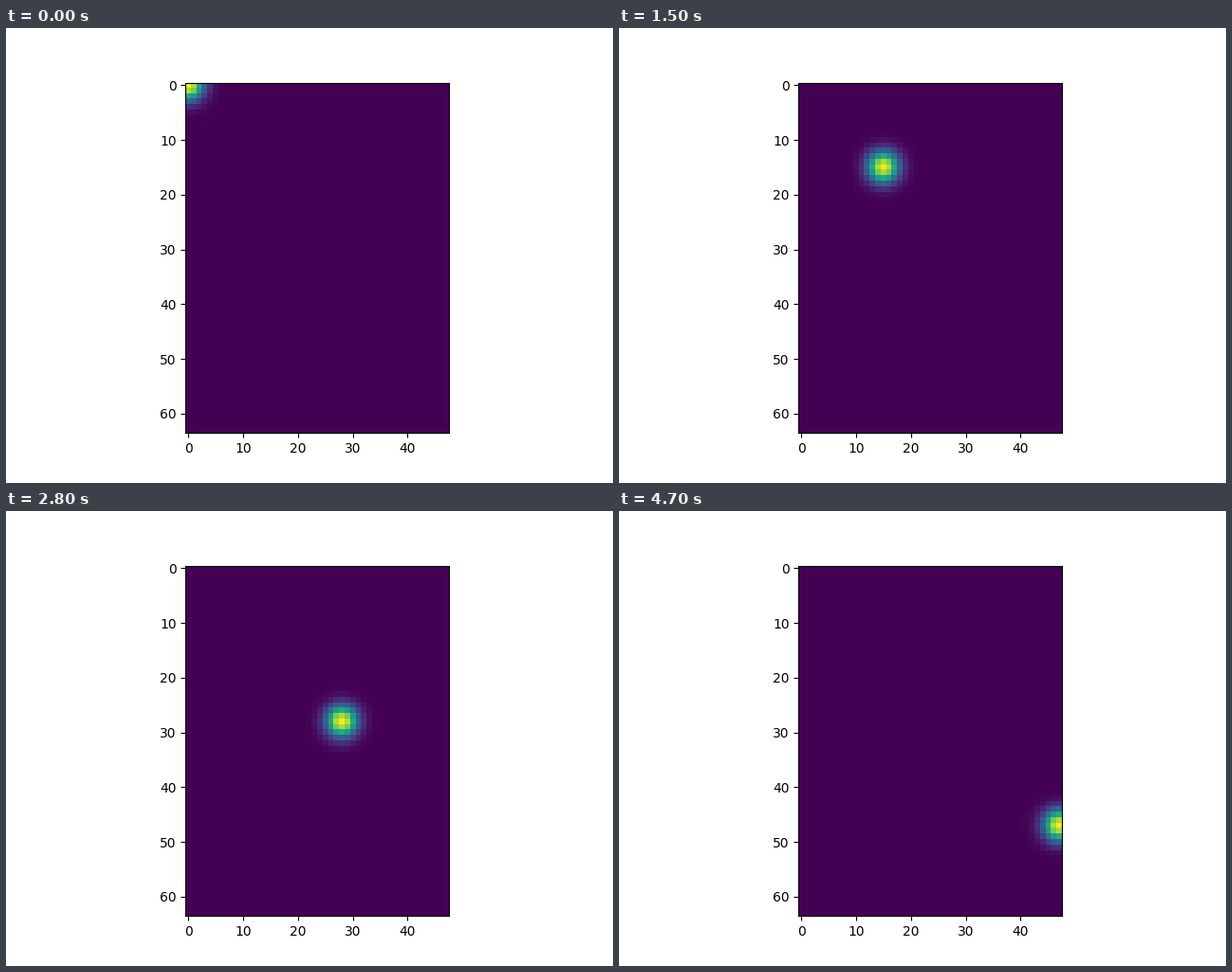
Recreate the animation shown at these times as a matplotlib script. Size 640 by 480 pixels, loop 4.8 s.

```python
import numpy as np
import matplotlib.pyplot as plt
from matplotlib.animation import FuncAnimation

ROWS, COLS = 64, 48
SIGMA = 2.0
INTERVAL = 100

plt.rcParams["font.family"] = "DejaVu Sans"
y, x = np.mgrid[:ROWS, :COLS]


def spot(step):
    """Gaussian blob centred on the diagonal cell (step, step)."""
    r2 = (x - step) ** 2 + (y - step) ** 2
    return np.exp(-r2 / (2 * SIGMA ** 2))


fig, ax = plt.subplots(figsize=(6.4, 4.8), dpi=100)
image = ax.imshow(spot(0), cmap="viridis", vmin=0, vmax=1,
                  interpolation="nearest")


def update(step):
    image.set_data(spot(step))
    return (image,)


anim = FuncAnimation(fig, update, frames=COLS, interval=INTERVAL,
                     repeat=True, repeat_delay=0, blit=False)
plt.show()
```
